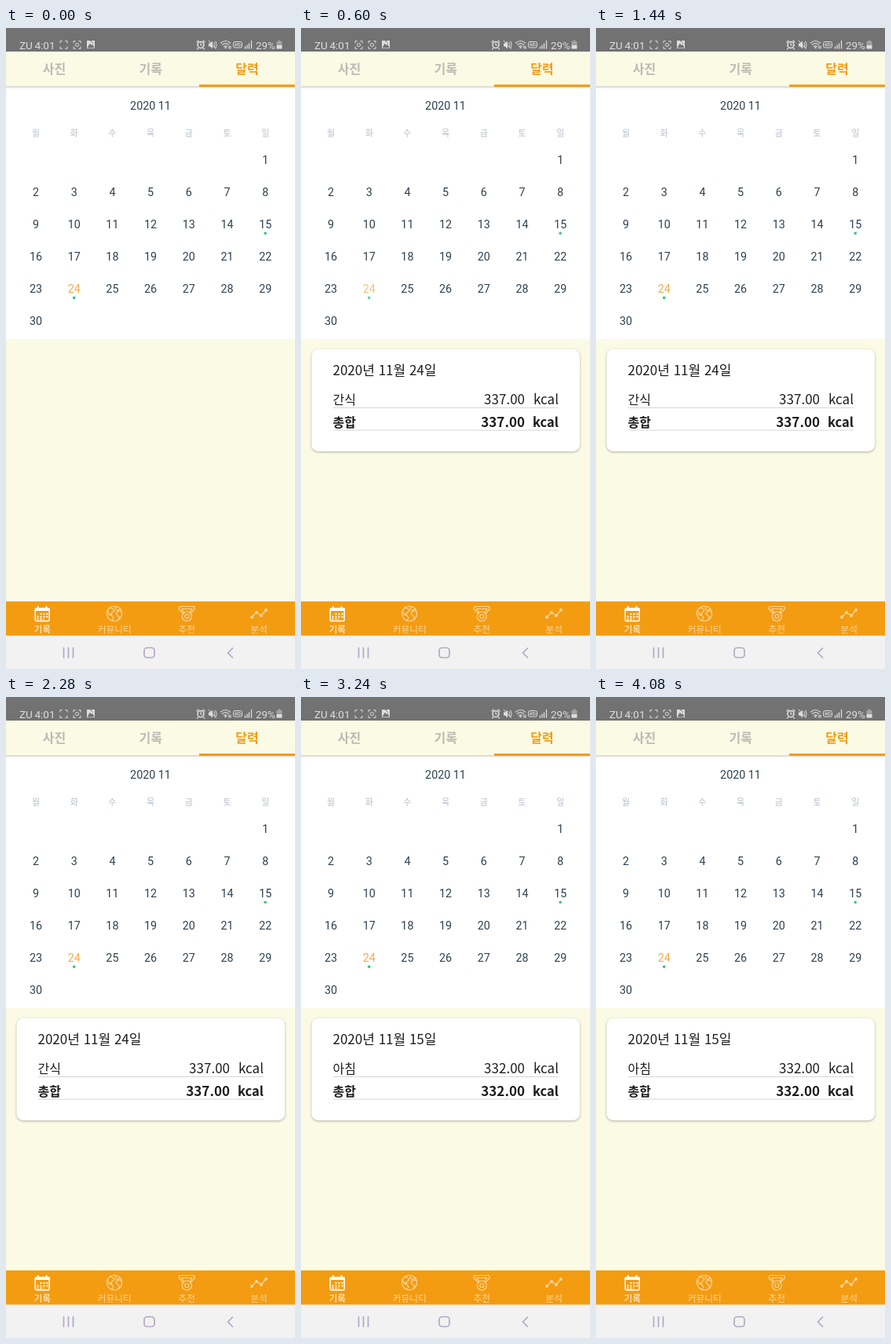
Write an HTML page that moves like this. It is 368 px wide and 816 px high and loops after 4.32 s.

```html
<!DOCTYPE html>
<html lang="ko">
<head>
<meta charset="utf-8">
<title>달력</title>
<style>
  html, body { margin: 0; width: 100%; height: 100%; overflow: hidden; background: #fbfae5; }
  svg { display: block; width: 100vw; height: 100vh; }
  text { font-family: "Noto Sans CJK KR", "Noto Sans CJK", "Noto Sans CJK JP", sans-serif; }
  .num { font-family: Roboto, sans-serif; font-size: 14.3px; fill: #2d4150; }
  .line { fill: none; stroke: currentColor; stroke-linecap: round; stroke-linejoin: round; }
  .card text { font-size: 17px; fill: #1c1c1c; }
  #card { filter: drop-shadow(0 1.5px 1.5px rgba(0, 0, 0, .3)); }
</style>
</head>
<body>
<svg viewBox="0 0 368 816" preserveAspectRatio="none">
  <defs>
    <linearGradient id="shade" x2="0" y2="1">
      <stop stop-color="#d2d2cb"/><stop offset="1" stop-color="#fff"/>
    </linearGradient>
    <path id="corners" d="M-4.5-2.5v-2.3h2.3M2.2-4.8h2.3v2.3M4.5 2.5v2.3H2.2M-2.2 4.8h-2.3V2.5"/>
  </defs>

  <!-- Status bar -->
  <rect width="368" height="30" fill="#727272"/>
  <g color="#dedede" fill="#dedede">
    <g class="line">
      <use href="#corners" x="73.5" y="21.5"/>
      <circle id="blink" cx="73.5" cy="21.5" r="2.1"/>
      <use href="#corners" x="90.5" y="21.5"/>
      <circle cx="90.5" cy="21.5" r="2.1"/>
    </g>
    <path d="M103 16h4l1 2 1-2h4v10h-10z"/>
    <path d="M104 25l3-5 2 3 1-2 2 4zM109 17l2 3" fill="#727272" stroke="#727272" stroke-width=".7"/>
    <g class="line">
      <circle cx="248" cy="21.5" r="4" stroke-width="1.6"/>
      <path d="M248 19v3h2M243 18l2-2M253 18l-2-2M244.500 26l-1 1M251.500 26l1 1" stroke-width="1.2"/>
      <path d="M258 16l9 10M265 18.500q1.500 3 0 6M267 17q2.500 4.500 0 9"/>
      <path d="M273.500 19q6-5 12 0M275.500 21.300q4-3.300 8 0M277.500 23.600q2-1.600 4 0M284 23v3M286 26v-3" stroke-width="1.2"/>
      <rect x="289.500" y="17.500" width="11" height="7.500" rx="2"/>
      <path d="M292 19.500v3.500M292 21.300h2M294 19.500v3.500M296 19.500v3.500q3.500 0 3-1.800t-3-1.700" stroke-width=".8"/>
      <path d="M304.500 24v2M307 22v4M309.500 20v6M312.500 16.500v9.500" stroke-width="1.3"/>
    </g>
    <path d="M258 19.500h2l3-3v10l-3-3h-2z"/>
    <path d="M279.500 23.500l1.500 2.500h-3z"/>
    <path d="M346.500 15.500h3v1.500h2v5h-7v-5h2z" opacity=".45"/>
    <path d="M344.500 22h7v4.500h-7z"/>
  </g>

  <!-- Tabs and calendar -->
  <rect y="30" width="368" height="45" fill="#fbfae5"/>
  <rect y="76" width="368" height="320" fill="#fff"/>
  <rect y="74" width="368" height="3.500" fill="url(#shade)"/>
  <rect x="246" y="72" width="122" height="3" fill="#f39c12"/>
  <g id="calendar"></g>

  <!-- Daily summary -->
  <g class="card" id="summary">
    <rect id="card" x="13.500" y="409" width="341.500" height="130" rx="8.500" fill="#fff"/>
    <path d="M41 483.500h287M41 512h287" stroke="#d6d6d6"/>
    <text id="date" x="40.500" y="442" style="font-weight:300"></text>
    <text id="meal" x="40.500" y="478.500" style="font-size:16px;font-weight:500"></text>
    <text class="kcal" x="285" y="478.500" text-anchor="end"></text>
    <text x="328" y="478.500" text-anchor="end">kcal</text>
    <g font-weight="700">
      <text x="40.500" y="507.500" style="font-size:16px">총합</text>
      <text class="kcal" x="285" y="507.500" text-anchor="end"></text>
      <text x="328" y="507.500" text-anchor="end" style="font-size:16.500px">kcal</text>
    </g>
  </g>

  <!-- Bottom navigation -->
  <rect y="730" width="368" height="44" fill="#f39c12"/>
  <rect y="773.500" width="368" height="42.500" fill="#f2f2f2"/>
  <g fill="#fff">
    <path d="M39 738h15q2 0 2 2v2H36.500v-2q0-2 2.500-2z"/>
    <path d="M41 736v3M51.500 736v3" stroke="#fff" stroke-width="2"/>
    <rect x="37.200" y="739" width="18" height="16" rx="2" fill="none" stroke="#fff" stroke-width="1.500"/>
    <path d="M43.500 746h10M39.500 749.500h14M39.500 752.500h9" stroke="#fff" stroke-width="2" stroke-dasharray="2 2"/>
  </g>
  <g class="line" color="#fad59b" stroke-width="1.200">
    <circle cx="138" cy="745.500" r="9.500"/>
    <path d="M132 738l4 1 2 3-3 2-1 3-3-2-2-3M131 747l4 1 2 3-2 3M140 736.500l-1 3 3 2 4-2M147 743l-4-1-3 3 2 3 2 1v4l3-4"/>
    <path d="M221 736.500h18.500l1 3-6 6M221 736.500l-1 3 6 6M223.500 739.500h13.500l-3 4M223.500 739.500l3 4"/>
    <circle cx="230.300" cy="749" r="6"/>
    <circle cx="230.300" cy="749" r="2.500"/>
    <path d="M313 750l6-6 6 4 6-7"/>
    <g fill="#fad59b">
      <circle cx="313" cy="750" r="1.300"/><circle cx="319" cy="744" r="1.300"/>
      <circle cx="325" cy="748" r="1.300"/><circle cx="331" cy="741" r="1.300"/>
    </g>
  </g>
  <g class="line" color="#b4a9c6" stroke-width="1.700">
    <path d="M73.500 789v12.500M79.500 789v12.500M85.500 789v12.500M288.500 789.500l-6 6 6 6"/>
    <rect x="176" y="789" width="13" height="12.500" rx="3.500"/>
  </g>
  <g id="labels"></g>
</svg>
<script>
const LOOP = 4320, STEP = 120;
const $ = id => document.getElementById(id);

function add(parent, tag, attrs, content = '') {
  const el = document.createElementNS('http://www.w3.org/2000/svg', tag);
  for (const key in attrs) el.setAttribute(key, attrs[key]);
  el.textContent = content;
  return parent.appendChild(el);
}
const label = (content, x, y, size, fill, weight = 400) =>
  add($('labels'), 'text', { x, y, fill, 'font-size': size, 'font-weight': weight, 'text-anchor': 'middle' }, content);
const number = (parent, content, x, y, style = '', anchor = 'middle') =>
  add(parent, 'text', { class: 'num', x, y, style, 'text-anchor': anchor }, content);

const statusStyle = 'font-size:13.5px;fill:#dedede';
number($('labels'), 'ZU', 17, 26.5, statusStyle, 'start');
number($('labels'), '4:01', 62.5, 26.5, statusStyle, 'end');
number($('labels'), '29%', 343, 26.5, statusStyle, 'end');

['사진', '기록', '달력'].forEach((name, i) =>
  label(name, 61.5 + 122.7 * i, 57.8, 16, i == 2 ? '#f39c12' : '#bcbab3', 700));
['기록', '커뮤니티', '추천', '분석'].forEach((name, i) =>
  label(name, 46.3 + 92 * i, 769.8, 11.7, i ? '#fad59b' : '#fff', i ? 400 : 500));

const columnX = i => 38 + 48.7 * i;
[...'월화수목금토일'].forEach((name, i) => label(name, columnX(i), 137.5, 11, '#b6c1cd'));
number($('calendar'), '2020 11', 184, 104);

const days = {};
for (let day = 1; day <= 30; day++) {
  const cell = day + 5, x = columnX(cell % 7), y = 172.6 + 41.1 * Math.floor(cell / 7);
  const group = days[day] = add($('calendar'), 'g', {});
  number(group, day, x, y, day == 24 ? 'fill:#f5aa4c' : '');
  if (day == 15 || day == 24)
    add(group, 'circle', { cx: x, cy: y + 6.4, r: 1.8, fill: day == 15 ? '#3abf8f' : '#2ecc71' });
}

const presses = [
  { at: 600, day: 24, meal: '간식', kcal: '337.00' },
  { at: 2400, day: 15, meal: '아침', kcal: '332.00' }
];
const blinkTimes = [120, 720, 960, 1440, 1920, 2280, 2760, 3240, 3720, 4080];

function draw(now) {
  const time = Math.floor(now % LOOP / STEP) * STEP;
  $('blink').style.opacity = blinkTimes.filter(t => t <= time).length % 2;

  const current = presses.filter(p => p.at <= time).pop();
  $('summary').style.display = current ? '' : 'none';
  if (current) {
    $('date').textContent = `2020년 11월 ${current.day}일`;
    $('meal').textContent = current.meal;
    document.querySelectorAll('.kcal').forEach(el => el.textContent = current.kcal);
  }
  for (const { at, day } of presses) {
    const fade = time < at ? 0 : Math.max(0, 1 - (time - at) / 250);
    days[day].style.opacity = 1 - 0.25 * fade;
  }
}

const start = performance.now();
function tick() {
  draw(performance.now() - start);
  requestAnimationFrame(tick);
}
tick();
</script>
</body>
</html>
```
